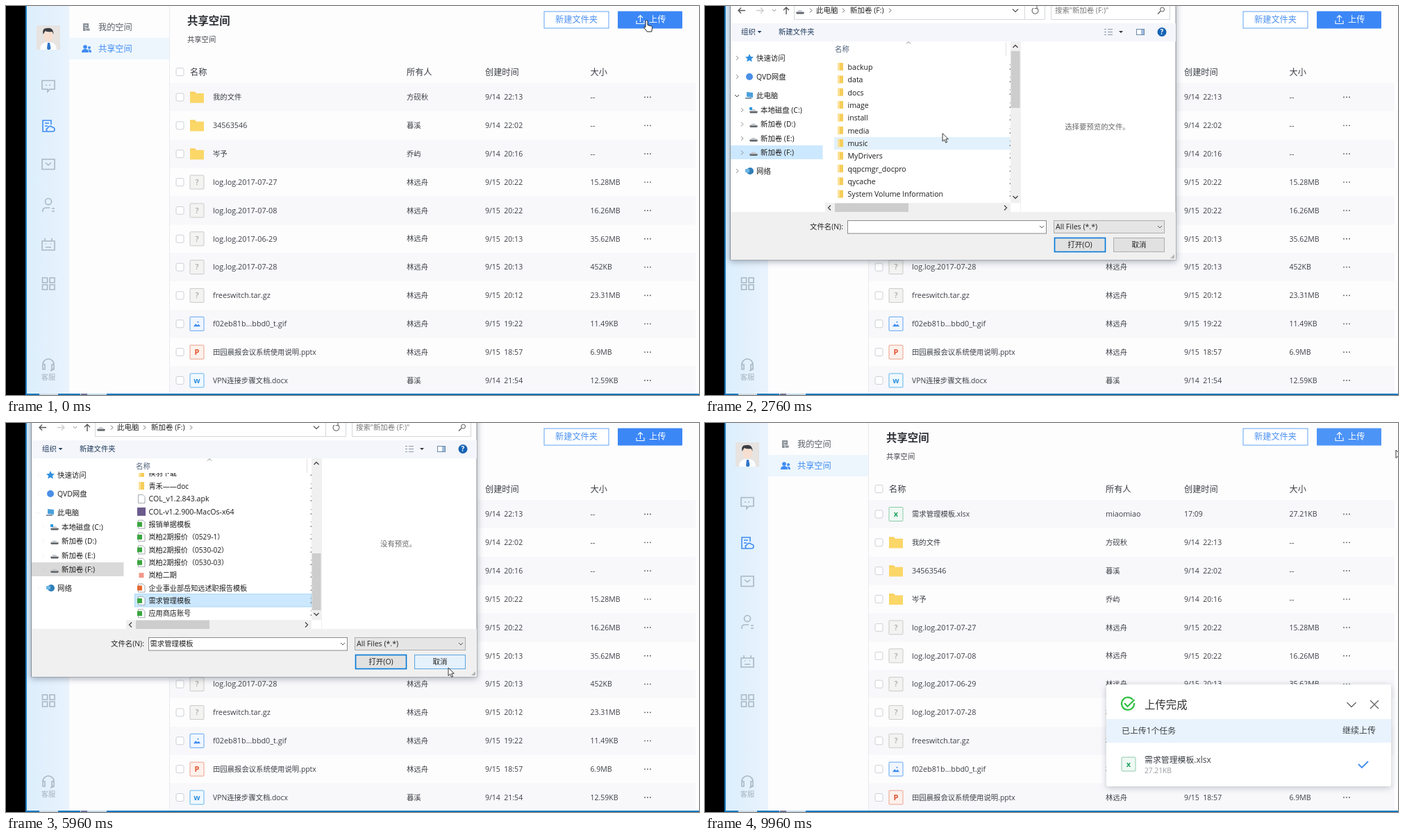
Recreate the animation shown at these times as an HTML page. Size 998 by 561 pixels, loop 10000 ms.

```html
<!DOCTYPE html>
<html lang="zh-CN">
<head>
<meta charset="utf-8">
<title>共享空间</title>
<style>
  html, body { margin: 0; width: 100%; height: 100%; overflow: hidden; background: #fdfdfe; }
  svg { display: block; width: 998px; height: 561px; }
  text { font-family: "Open Sans", "Noto Sans CJK SC", "Noto Sans CJK", sans-serif; }
  .line { fill: none; stroke: #a8b8c4; stroke-width: 1.6; }
  .blue { stroke: #3f8cf2; }
  .shadow { filter: drop-shadow(0 2px 5px rgba(40, 50, 70, .4)); }
  .soft { filter: drop-shadow(0 2px 5px rgba(60, 70, 90, .3)); }
</style>
</head>
<body>
<svg id="stage" viewBox="0 0 998 561"></svg>
<script>
const LOOP = 10000, ROW = 40.85, ITEM = 18.36;

// Drawing helpers; text is placed by its vertical centre.
const text = (x, y, s, size = 10.5, fill = '#3c3f44', more = '') =>
  `<text x="${x}" y="${y + size * .36}" font-size="${size}" fill="${fill}" ${more}>${s}</text>`;
const rect = (x, y, w, h, fill, more = '') =>
  `<rect x="${x}" y="${y}" width="${w}" height="${h}" fill="${fill}" ${more}/>`;
const path = (d, more = 'class="line"') => `<path d="${d}" ${more}/>`;
const stroke = (d, color, w = 1) => path(d, `fill="none" stroke="${color}" stroke-width="${w}"`);
const group = (id, body, more = '') => `<g id="${id}" ${more}>${body}</g>`;
const at = (x, y, body) => `<g transform="translate(${x} ${y})">${body}</g>`;
const bodySize = s => /[\u4e00-\u9fff]/.test(s) ? 10.35 : 10.8;
const middle = 'text-anchor="middle"';

// ---- Shared space page ----
const tile = (edge, fill, mark) => rect(-10, -10, 20, 20, fill, `stroke="${edge}" rx="1"`) + mark;
const letter = (s, color) => text(0, 0, s, 11, color, middle + ' font-weight="700"');
const tiles = {
  dir: path('M-10 -8h7l2 2.5h11v13.5h-20z', 'fill="#f9d263"') + rect(-10, -4.5, 20, 12.5, '#fbd768'),
  any: tile('#c9ccca', '#f3f3f1', text(0, 0, '?', 10.5, '#a5a8a6', middle + ' font-weight="600"')),
  gif: tile('#62a5f3', '#f0f6fe', path('M-5 4l3-4 2.500 2 2-1.500 2.500 3.500z', 'fill="#3f8cf2"') + '<circle cx="1.500" cy="-2.500" r="1" fill="#3f8cf2"/>'),
  ppt: tile('#eda08a', '#fdf1ec', letter('P', '#e2522f')),
  doc: tile('#62b5ec', '#f0f8fe', letter('w', '#2f93e0')),
  xls: tile('#8ccbaa', '#f0f9f4', letter('x', '#21a35f'))
};
const who = '林远舟';
const files = [
  ['xls', '需求管理模板.xlsx', 'miaomiao', '17:09', '27.21KB'],
  ['dir', '我的文件', '方砚秋', '9/14  22:13', '--'],
  ['dir', '34563546', '暮溪', '9/14  22:02', '--'],
  ['dir', '岑予', '乔屿', '9/14  20:16', '--'],
  ['any', 'log.log.2017-07-27', who, '9/15  20:22', '15.28MB'],
  ['any', 'log.log.2017-07-08', who, '9/15  20:22', '16.26MB'],
  ['any', 'log.log.2017-06-29', who, '9/15  20:13', '35.62MB'],
  ['any', 'log.log.2017-07-28', who, '9/15  20:13', '452KB'],
  ['any', 'freeswitch.tar.gz', who, '9/15  20:12', '23.31MB'],
  ['gif', 'f02eb81b...bbd0_t.gif', who, '9/15  19:22', '11.49KB'],
  ['ppt', '田园晨报会议系统使用说明.pptx', who, '9/15  18:57', '6.9MB'],
  ['doc', 'VPN连接步骤文档.docx', '暮溪', '9/14  21:54', '12.59KB']
];
const box = y => rect(245, y - 5.5, 11, 11, '#fff', 'stroke="#cdd0d5" rx="2"');
const fileRow = ([kind, name, owner, time, size], i) => {
  const y = 131.5 + i * ROW;
  const cell = (x, s) => text(x, y, s, bodySize(s) - (x > 600 ? .3 : 0));
  return group(i ? '' : 'newRow', box(y) + at(275, y, tiles[kind]) + cell(298, name) + cell(577, owner) +
    cell(690, time.replace(/ /g, '\u00a0')) + cell(841.5, size) +
    [920, 924, 928].map(x => `<circle cx="${x}" cy="${y}" r=".9" fill="#555"/>`).join(''));
};
const stripes = [0, 2, 4, 6, 8, 10].map(i => rect(236, 111 + i * ROW, 757, ROW, '#f8f8fb')).join('');

const avatar = at(44, 28, rect(0, 0, 34, 35, '#e6e3e1') +
  path('M5 35q0-9 8-11h8q8 2 8 11z', 'fill="#fbfcfe"') +
  path('M16 25h3l1.500 8-1.500 2h-3l-1-2z', 'fill="#2f76c9"') +
  '<ellipse cx="17" cy="14.500" rx="6.800" ry="9" fill="#f6dfd0"/>' +
  path('M9.500 13q-2-9 5-9 10-2 10 9l-2-4q-6 1-10-1z', 'fill="#3a3d43"'));

const sideIcons = avatar +
  path('M52 107.500h18v12.500h-7l-3 3.500v-3.500h-8zM57 114h2M62 114h2') +
  path('M60 181h-7v-16h12v6M56 169h6M56 173h4M62 181h5a3 3 0 0 0 0-6 4 4 0 0 0-7 1 2.600 2.600 0 0 0 2 5z', 'class="line blue"') +
  path('M52 221h18v14.500h-18zM57 226l4 3.500 4-3.500') +
  path('M53 297v-2q0-4 5-4h5M66 292h4M66 296h4') + '<circle class="line" cx="61" cy="282" r="4.500"/>' +
  path('M52 339h18v13h-18zM56 339v-4M66 339v-4M57 343h1M64 343h1M57 348h8') +
  path('M52.500 392h7v7h-7zM63 392h7v7h-7zM52.500 402h7v7h-7zM63 402h7v7h-7z') +
  path('M53 521v-4a8 8 0 0 1 16 0v4q0 4-5 5M53 517h3v7h-3zM66 517h3v7h-3z') +
  text(61, 535, '客服', 10.3, '#a3b3bf', middle);

const page =
  rect(0, 0, 998, 561, '#fdfdfe') + rect(0, 0, 28, 561, '#000') + rect(28, 0, 2, 561, '#1f80c2') +
  rect(30, 0, 61, 561, 'url(#side)') + sideIcons +
  rect(91, 46, 144, 31, '#edf6fd') + rect(235, 0, 1, 561, '#e9eaee') +
  at(115, 31, rect(-4, -6, 8, 11, '#8b9299') + path('M-2-3h4M-2 0h2', 'stroke="#fff"') + rect(0, 1, 6, 4, '#8b9299', 'stroke="#fff" stroke-width=".8"')) +
  at(116, 62, '<g fill="#3f8cf2"><circle cx="-2" cy="-3" r="2.800"/><path d="M-7 5q0-5 5-5t5 5z"/><circle cx="4" cy="-2" r="2"/><path d="M4 5q0-3-2-4 5-1 5 4z"/></g>') +
  text(133, 31, '我的空间', 12.2, '#5a5f66') + text(133, 62, '共享空间', 12.2, '#3f8cf2') +
  text(261, 21, '共享空间', 15.4, '#2c2f34', 'font-weight="700"') + text(261, 48.5, '共享空间', 10.3) +
  rect(775, 8, 93, 24, '#fff', 'stroke="#63a4f4"') + text(821.5, 20, '新建文件夹', 12.2, '#4a90f2', middle) +
  rect(881, 7.5, 93, 25, '#3c87f6', 'id="upload" rx="1"') +
  stroke('M908 21v4.500h11v-4.500M913.500 23v-9M910 17l3.500-3.500 3.500 3.500', '#fff', 1.1) + text(926, 20, '上传', 12.2, '#fff') +
  box(95) + text(265, 95.5, '名称', 12.2) + text(577, 95.5, '所有人', 12.2) + text(690, 95.5, '创建时间', 12.2) + text(841.5, 95.5, '大小', 12.2) +
  stripes + group('rows', files.map(fileRow).join('')) +
  rect(993, 80, 5, 406, '#c6c8cb', 'id="bar" rx="2"') +
  rect(28, 559, 970, 2, '#1278bf') + rect(48, 559, 27, 2, '#cfdce6') + rect(107, 559, 38, 2, '#c3d8e8') + rect(108, 559, 9, 2, '#6c6f93');

// ---- Upload panel ----
const panel = rect(578, 377, 410, 147, '#fff', 'class="soft" rx="3"') + rect(578, 427, 410, 34, '#e8f3fd') +
  group('busy', '<circle cx="609" cy="405" r="8.500" fill="none" stroke="#3f8cf2" stroke-width="2" stroke-dasharray="40 14"/>' +
    text(633, 406, '正在上传', 15.4, '#333') + text(600, 444, '正在上传1个任务', 11.9) + rect(633, 511, 0, 2, '#3f8cf2', 'id="meter"')) +
  group('done', stroke('M616 399a9 9 0 1 0 2 5M604 404l4.500 5 10-10', '#2fc043', 2.2) +
    text(633, 406, '上传完成', 15.4, '#333') + text(600, 444, '已上传1个任务', 11.9) + stroke('M941 492l5 5 9-9', '#3f8cf2', 1.8)) +
  stroke('M924.500 403l6.500 6.500 6.500-6.500M958 400l12 12M970 400l-12 12', '#666', 1.4) +
  text(918, 444, '继续上传', 12) + at(610, 492, tiles.xls) + text(633, 486, '需求管理模板.xlsx', 11.9) + text(633, 501.5, '27.21KB', 10.2, '#9a9da2');

// ---- File dialog ----
const sheet = body => path('M-4.500-6h6.500l3 3v9h-9.500z', 'fill="#fff" stroke="#8f969c" stroke-width=".8"') + body;
const icons = {
  dir: rect(-4, -6, 8, 11, '#f6cd5b') + rect(-4, -6, 3, 11, '#fbe198'),
  raw: sheet(''),
  dll: sheet('<circle cy="1" r="2.300" fill="none" stroke="#7f9fc0" stroke-width="1.300"/>'),
  txt: sheet(stroke('M-3-3h4M-3-1h6M-3 1h6M-3 3h6', '#8f969c', .8)),
  web: sheet('<circle r="4.500" fill="#3ba3dc"/>'),
  zip: rect(-6, -6, 12, 12, '#6b5a8c'),
  xls: sheet(rect(-6, -3.5, 7, 7, '#3aa63f')),
  ppt: sheet(rect(-6, -3.5, 7, 7, '#e5682f')),
  map: rect(-3.5, -3.5, 7, 7, '#f2988a')
};
const dirs = s => s.split('|').map(n => ['dir', n]);
const listC = [...dirs('locales|resources|swiftshader'), ['raw', 'chrome_100_percent.pak'], ['raw', 'chrome_200_percent.pak'],
  ['dll', 'ffmpeg.dll'], ['raw', 'icudtl.dat'], ['dll', 'libEGL.dll'], ['dll', 'libGLESv2.dll'],
  ['txt', 'LICENSE.electron'], ['web', 'LICENSES.chromium'], ['raw', 'natives_blob.bin']];
const listF = [...dirs('backup|data|docs|image|install|media|music|MyDrivers|qqpcmgr_docpro|qycache|System Volume Information|岚柏|岚柏二期|团建视频|商标|新建文件夹|疾羽下载|青禾——doc'),
  ['raw', 'COL_v1.2.843.apk'], ['zip', 'COL-v1.2.900-MacOs-x64'], ['xls', '报销单据模板'],
  ...['0529-1', '0530-02', '0530-03'].map(n => ['xls', `岚柏2期报价（${n}）`]), ['map', '岚柏二期'],
  ['ppt', '企业事业部岳知远述职报告模板'], ['xls', '需求管理模板'], ['xls', '应用商店账号']];
const itemY = i => 88 + i * ITEM;
const list = (items, dateX) => items.map(([kind, name], i) =>
  at(195, itemY(i), icons[kind]) + text(205.5, itemY(i), name, bodySize(name) - .2, '#1c1c1c') +
  text(dateX, itemY(i), (i < 3 ? '2020/9/14' : '2018/11/2'), 10.3, '#777')).join('');

const drive = (win = '') => path('M-6 2l4-3h3l5 3z', 'fill="#c4c8cc"') + path('M-6 2h12l-1 2.500h-10z', 'fill="#5f6469"') + win;
const screen = path('M-4-5l9 1v7l-9-1z', 'fill="#4aa0dc"') + rect(-6, 3, 9, 2, '#8795a3');
const network = '<circle r="5" cx="1" fill="#2f7fb8"/>' + rect(-6, -3, 6, 5, '#6bb6e6');
const navItems = [
  [75, 74, '快速访问', path('M0-6l1.800 4 4.200.400-3.200 2.800 1 4.300-3.800-2.300-3.800 2.300 1-4.300-3.200-2.800 4.200-.400z', 'fill="#2f8fe0"')],
  [102, 74, 'QVD网盘', '<circle r="5" fill="#4a8fe8"/>'],
  [129, 74, '此电脑', screen],
  [150, 80, '本地磁盘 (C:)', drive(rect(-6, -4, 4, 4, '#2f9ae0'))],
  [170.5, 80, '新加卷 (D:)', drive()], [191, 80, '新加卷 (E:)', drive()], [211.5, 80, '新加卷 (F:)', drive()],
  [238, 74, '网络', network]
];
const nav = navItems.map(([y, x, s, icon]) => at(x - 10, y, icon) + text(x, y, s, 10.4, '#1c1c1c')).join('');
const arrows = navItems.map(([y, x], i) => i === 2 ? stroke(`M43 ${y - 1}l3 3 3-3`, '#444') :
  stroke(`M${x === 74 ? 45 : 52} ${y - 3}l3 3-3 3`, '#8a8a8a')).join('');
const crumb = (x, s) => text(x, 6.5, s, 10.5, '#222');
const chev = x => stroke(`M${x} 3.500l3 3-3 3`, '#666');
const find = s => text(504, 6.5, `搜索"${s}"`, 10.4, '#777');
const back = color => stroke('M58 6.500h-10M52 2.500l-4 4 4 4', color, 1.3);
const button = (id, x, s) => rect(x + .5, 334.5, 73, 20, '#e1e1e1', `id="${id}" stroke="#adadad"`) + text(x + 37, 344.5, s, 10.5, '#222', middle);

const dialog =
  rect(36.5, -20, 641.500, 386, '#fff', 'class="shadow" stroke="#8d9299"') +
  rect(128.5, -10, 332, 29.5, '#fff', 'stroke="#d5d7da"') + rect(498.5, -10, 171, 29.5, '#fff', 'stroke="#d5d7da"') +
  stroke('M74 6.500h10M80 2.500l4 4-4 4', '#ccc', 1.3) + stroke('M97 5l2.500 2.500 2.500-2.500', '#888') + stroke('M117 12v-10M113 6l4-4 4 4', '#555', 1.4) +
  stroke('M443 4.500l4 4 4-4', '#555', 1.2) + stroke('M460.500 19.500h29v-29', '#d5d7da') +
  stroke('M478 3a4.500 4.500 0 1 1-5 0M478 0v3.500h-3.500', '#666', 1.1) +
  '<circle cx="658.500" cy="5" r="3" fill="none" stroke="#555"/>' + stroke('M656 7.500l-4 4', '#555', 1.3) +
  group('addrC', back('#ccc') + rect(133, 1, 7, 10, '#f6cd5b') + crumb(148, '«') + crumb(160, 'Program Files (x86)') + chev(263) + crumb(273, 'XIAOYUANPAI') + chev(352) + find('XIAOYUANPAI')) +
  group('addrF', back('#555') + at(137, 7, drive()) + chev(151) + crumb(160, '此电脑') + chev(198) + crumb(209, '新加卷 (F:)') + chev(265) + find('新加卷 (F:)')) +
  rect(37, 25, 641, 26, '#f4f6fb') + text(52, 37.5, '组织', 10.4, '#1e395b') + path('M75.500 36h6l-3 3z', 'fill="#1e395b"') + text(106, 37.5, '新建文件夹', 10.3, '#1e395b') +
  stroke('M575 33.500h3M580 33.500h7M575 37.500h3M580 37.500h7M575 41.500h3M580 41.500h7', '#8e9aa8') + path('M596 36h6l-3 3z', 'fill="#333"') +
  rect(621.5, 33.5, 11, 8, '#fff', 'stroke="#6d87a5"') + rect(628, 34, 4, 7, '#9dbbdd') +
  '<circle cx="658" cy="37.500" r="6.500" fill="#1663b3"/>' + text(658, 37.5, '?', 10, '#fff', middle + ' font-weight="700"') +
  rect(37, 140, 132.5, 20, '#d9d9d9', 'id="navSel"') + nav + group('arrows', arrows) +
  group('items', rect(186, 0, 254, ITEM, '#dbecf9', 'id="hover"') + rect(185.5, 0, 254, ITEM, '#cce8ff', 'id="picked" stroke="#a9d6f7"') +
    group('listC', list(listC, 409)) + group('listF', list(listF, 438)), 'clip-path="url(#view)"') +
  text(187, 62, '名称', 10.4, '#4c607a') + stroke('M290 54.500l3-3 3 3', '#888') +
  group('dateHead', text(409, 62, '修改日', 10.4, '#4c607a')) + stroke('M0 52v20', '#e2e2e2').replace('<path', '<path id="split"') +
  rect(440, 51, 14, 233, '#f0f0f0') + rect(440.5, 65, 13, 91, '#cdcdcd', 'id="thumb"') + stroke('M443.500 60l3.500-3.500 3.500 3.500M443.500 274l3.500 3.500 3.500-3.500', '#444', 1.3) +
  rect(173, 284, 267, 13, '#f0f0f0') + rect(187, 284.5, 119, 12.5, '#cdcdcd', 'id="hThumb"') + stroke('M181 287.500l-3.500 3.500 3.500 3.500M431 287.500l3.500 3.500-3.500 3.500', '#444', 1.3) +
  stroke('M454.500 51v246', '#f0f0f0') + text(565, 174.5, '', 10.4, '#666', middle + ' id="preview"') +
  rect(37, 297, 641, 69, '#f0f0f0') + text(151, 318.5, '文件名(N):', 10.4, '#222') +
  rect(205.5, 309.5, 286, 18.5, '#fff', 'id="field" stroke="#8a8a8a"') + rect(207, 312, 63, 13, '#0078d7', 'id="mark"') +
  text(207.5, 318.5, '需求管理模板', 10.35, '#222', 'id="fileName"') +
  rect(502.5, 309.5, 159, 18, '#e5e5e5', 'stroke="#adadad"') + text(505, 318.5, 'All Files (*.*)', 10.6, '#222') + stroke('M482 317l3 3 3-3M652 317l3 3 3-3', '#555') +
  button('ok', 503, '打开(O)') + button('cancel', 588, '取消') +
  path('M676 358v6h-6z', 'fill="#b5b5b5"');

const tip = (id, x, y, w, lines) => group(id, rect(x, y, w, 44, '#fff', 'class="soft" stroke="#8c8c8c"') +
  lines.map((s, i) => text(x + 4, y + 8.5 + i * 13.6, s, 10.4, '#575757')).join(''));

const hand = path('M0 1.500q0-2 1.500-2t1.500 2v5l5.500 1.500q1.500.500 1.200 2.500l-1 5.500h-6.500l-4.500-6q-.500-2 2.300-.500z', 'fill="#fff" stroke="#222"');
const arrow = path('M0 0v11.500l2.700-2.500 1.900 4.400 2-.900-1.900-4.300h3.600z', 'fill="#fff" stroke="#222" stroke-width=".9"');

const stage = document.getElementById('stage');
stage.innerHTML =
  '<defs><linearGradient id="side"><stop stop-color="#dceefc"/><stop offset="1" stop-color="#e9f3fd"/></linearGradient>' +
  '<clipPath id="view"><rect x="173" y="72" width="267" height="212"/></clipPath></defs>' +
  page + group('panel', panel) +
  group('dialog', dialog) +
  tip('tipDir', 368.5, 191.5, 204, ['创建日期: 2020/3/11 14:21', '大小: 168 MB', '文件夹: backup, hotfix, software, update']) +
  tip('tipXls', 373.5, 200.5, 135, ['类型: XLSX 工作表', '大小: 68.1 KB', '修改日期: 2020/5/30 12:20']) +
  '<circle id="ring" r="12" fill="#fff" fill-opacity=".35" stroke="#e0564a" stroke-width="3"/>' +
  group('hand', hand) + group('arrow', arrow);

// ---- Timeline ----
const el = {};
stage.querySelectorAll('[id]').forEach(e => { if (e.id) el[e.id] = e; });
const set = (id, attrs) => { for (const k in attrs) el[id].setAttribute(k, attrs[k]); };
const show = (id, on) => { el[id].style.display = on ? '' : 'none'; };
const ramp = (t, a, b) => Math.min(1, Math.max(0, (t - a) / (b - a)));
const between = (t, a, b) => t >= a && t < b;

const route = [[0, 921, 21], [1100, 921, 21], [1950, 300, 80], [2100, 212, 117], [2380, 102, 208], [2520, 102, 208],
  [2820, 369, 181], [3700, 369, 181], [4060, 371, 190], [4200, 335, 233], [4560, 262, 252], [4900, 262, 252],
  [5700, 625, 344], [5960, 637, 353], [6400, 637, 353], [7000, 546, 344], [8350, 546, 344], [9300, 930, 130], [9960, 995, 39], [LOOP, 995, 39]];
const pointer = t => {
  const i = Math.max(1, route.findIndex(k => k[0] > t));
  const [a, x, y] = route[i - 1], [b, u, v] = route[i];
  const p = ramp(t, a, b), e = p * p * (3 - 2 * p);
  return [x + (u - x) * e, y + (v - y) * e];
};
const clicks = [700, 2440, 4640, 7180];
const wheel = [[2840, 48], [2920, 96], [3000, 144], [3720, 199], [3820, 254], [3920, 309]];
const OPEN = 940, DRIVE = 2480, PICK = 4680, CLOSE = 7240, DONE = 8300;

function draw(t) {
  const [x, y] = pointer(t), [hx, hy] = pointer(Math.max(0, t - 60));
  const place = `translate(${x} ${y})`;
  const onF = t >= DRIVE, picked = t >= PICK, closing = t >= CLOSE;
  const scroll = wheel.reduce((s, [at, v]) => t >= at ? v : s, 0);

  show('hand', t < OPEN);
  show('arrow', t >= OPEN);
  set('hand', { transform: place });
  set('arrow', { transform: place });
  const click = clicks.find(c => between(t, c, c + 300));
  show('ring', click !== undefined);
  if (click !== undefined) set('ring', { transform: `translate(${x} ${y + 2})`, opacity: .8 * (1 - ramp(t, click + 160, click + 300)) });

  // Dialog opening and closing
  const visible = ramp(t, OPEN, OPEN + 160) * (1 - ramp(t, CLOSE, CLOSE + 125));
  const scale = closing ? 1 - .033 * ramp(t, CLOSE, CLOSE + 80) : .95 + .05 * ramp(t, OPEN, OPEN + 160);
  show('dialog', visible > 0);
  set('dialog', { opacity: visible, transform: `translate(357 155) scale(${scale}) translate(-357 -155)` });

  show('addrC', !onF); show('listC', !onF); show('dateHead', !onF);
  show('addrF', onF); show('listF', onF);
  set('split', { transform: `translate(${onF ? 433.5 : 403.5} 0)` });
  set('listF', { transform: `translate(0 ${-scroll})` });
  set('thumb', { y: 65 + scroll * .398, height: onF ? 82 : 91 });
  set('hThumb', { width: onF ? 106 : 119 });
  set('navSel', { y: onF ? 201 : 139.5, fill: onF && !picked ? '#cce8ff' : '#d9d9d9' });
  set('arrows', { opacity: ramp(t, 2200, 2400) * (1 - ramp(t, 5600, 6000)) });

  const row = Math.round((hy + (onF ? scroll : 0) - 88) / ITEM);
  show('hover', t > OPEN && between(hx, 186, 440) && between(hy, 73, 283) && !closing);
  set('hover', { y: itemY(row) - (onF ? scroll : 0) - ITEM / 2, fill: onF ? '#e2f1fc' : '#dbecf9' });
  show('picked', picked);
  set('picked', { y: itemY(26) - scroll - ITEM / 2 - .5, fill: closing ? '#d9d9d9' : '#cce8ff', stroke: closing ? '#d9d9d9' : '#a9d6f7' });
  el.preview.textContent = picked ? '没有预览。' : '选择要预览的文件。';

  show('fileName', picked);
  show('mark', closing);
  set('fileName', { fill: closing ? '#fff' : '#222' });
  set('field', { stroke: !onF || closing ? '#2b88d8' : '#8a8a8a' });
  const over = left => between(x, left, left + 73) && between(y, 334, 355);
  set('ok', { fill: over(503) ? '#d5ebfa' : '#e1e1e1', stroke: '#0078d7', 'stroke-width': 1.6 });
  set('cancel', { fill: over(588) ? '#e5f1fb' : '#e1e1e1', stroke: over(588) ? '#5aa5e0' : '#adadad' });

  show('tipDir', between(t, 3300, 3700));
  set('tipDir', { opacity: ramp(t, 3280, 3500) });
  show('tipXls', between(t, 4000, 4260));
  set('tipXls', { opacity: ramp(t, 3960, 4080) });

  // Upload result
  const uploaded = t >= DONE + 80;
  set('upload', { fill: closing ? '#4d94f7' : '#3c87f6' });
  show('bar', closing && y > 80 && x < 993);
  show('newRow', uploaded);
  set('rows', { transform: `translate(0 ${uploaded ? 0 : -ROW})` });
  const rise = ramp(t, 7700, 7900);
  show('panel', rise > 0);
  set('panel', { opacity: rise, transform: `translate(0 ${(1 - rise) ** 2 * 40})` });
  show('busy', t < DONE);
  show('done', t >= DONE);
  set('meter', { width: 290 * ramp(t, 7800, DONE) });
}

const start = performance.now();
function tick() {
  draw((performance.now() - start) % LOOP);
  requestAnimationFrame(tick);
}
tick();
</script>
</body>
</html>
```
